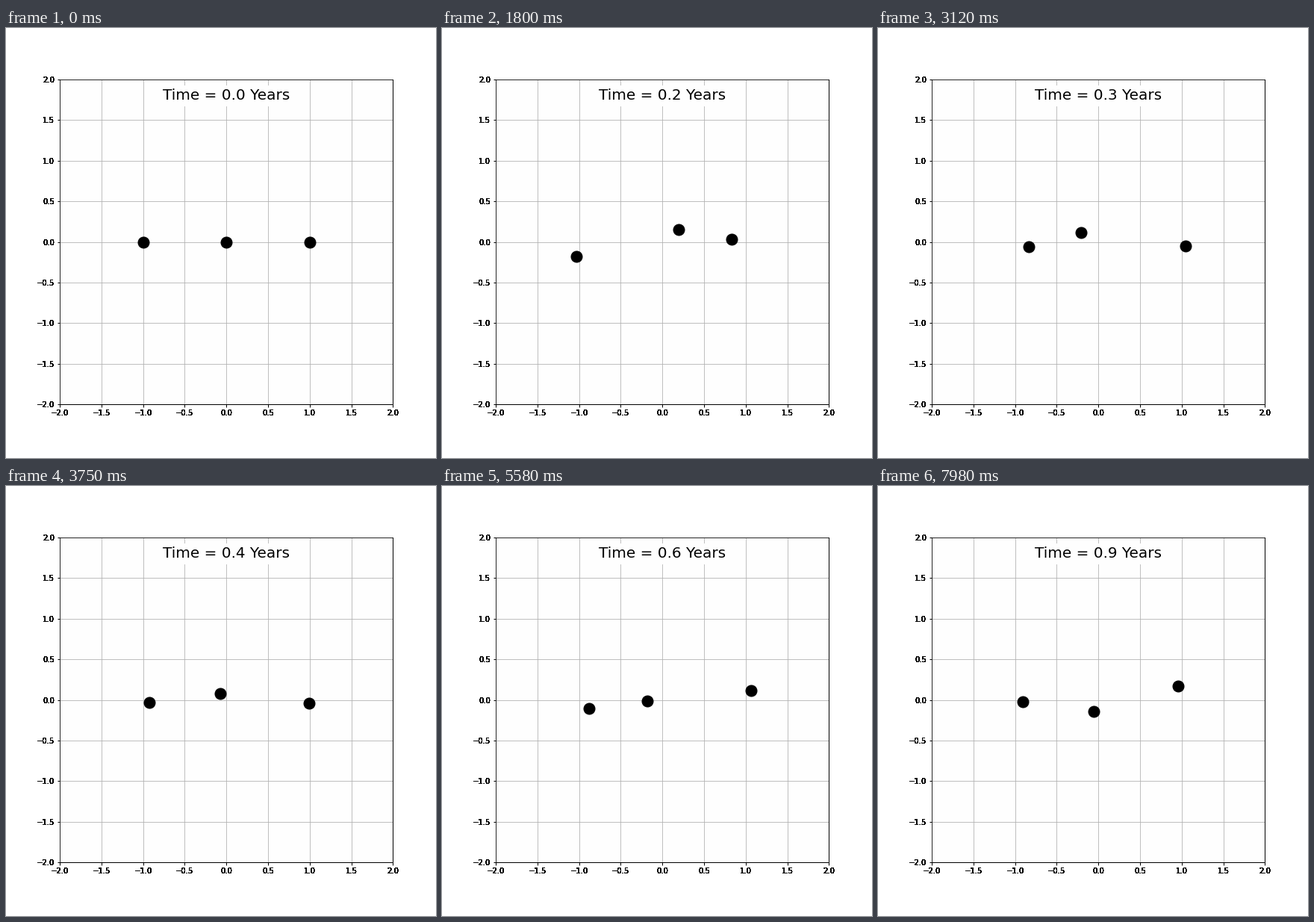
Write a matplotlib script that moves like this. It is 576 px wide and 576 px high and loops after 8000 ms.

```python
import numpy as np
import matplotlib.pyplot as plt
from matplotlib.animation import FuncAnimation

FRAMES = 267
LOOP_MS = 8000
YEARS_PER_FRAME = 0.0032
CYCLE = 175          # frames in one full cycle of the chain
LABEL_PASSES = 12


def positions(i):
    """Three bodies in a swinging chain whose centre of mass stays put."""
    phase = 2 * np.pi * i / CYCLE
    settle = 1 - np.exp(-i / 12)
    slide = -0.24 * np.sin(2 * phase) - 0.03 * np.sin(phase)
    stretch = settle * (0.026 * np.cos(phase + 0.45) - 0.047)
    bend = 0.14 * np.sin(phase / 2) + 0.035 * np.sin(phase)
    tilt = settle * (0.055 + 0.063 * np.sin(0.0325 * i + 0.000065 * i**2))
    x = [-1 - stretch - slide / 2, slide, 1 + stretch - slide / 2]
    y = [-bend / 2 - tilt, bend, -bend / 2 + tilt]
    return x, y


plt.rcParams["font.family"] = "DejaVu Sans"
fig = plt.figure(figsize=(8, 8), dpi=72, facecolor="white")
ax = fig.add_axes([0.125, 0.125, 0.775, 0.755], facecolor="#fefefe")
ticks = np.linspace(-2, 2, 9)
ax.set(xlim=(-2, 2), ylim=(-2, 2), xticks=ticks, yticks=ticks)
ax.grid(True, color="#b0b0b0", linewidth=0.8)
ax.set_axisbelow(True)
ax.tick_params(width=1, labelbottom=False, labelleft=False)
ax.spines[["bottom", "right"]].set_linewidth(1)


def tick_labels(placement, horizontal):
    """Heavy tick labels: the same text laid over itself."""
    trans, va, ha = placement
    for v in ticks:
        label = f"{v:.1f}".replace("-", "\u2212")
        x, y = (v, 0) if horizontal else (0, v)
        for _ in range(LABEL_PASSES):
            ax.text(x, y, label, transform=trans, va=va, ha=ha, fontsize=10)


tick_labels(ax.get_xaxis_text1_transform(7), True)
tick_labels(ax.get_yaxis_text1_transform(7), False)

bodies, = ax.plot(*positions(0), "o", color="black", markersize=15, zorder=3)
clock = ax.text(0.5, 0.95, "", transform=ax.transAxes, ha="center", va="center",
                fontsize=20, zorder=4,
                bbox=dict(facecolor="#fefefe", edgecolor="none", pad=4.5))


def update(i):
    bodies.set_data(*positions(i))
    clock.set_text(f"Time = {i * YEARS_PER_FRAME:.1f} Years")
    return bodies, clock


anim = FuncAnimation(fig, update, frames=FRAMES, interval=LOOP_MS / FRAMES,
                     repeat=True, repeat_delay=0)
plt.show()
```
